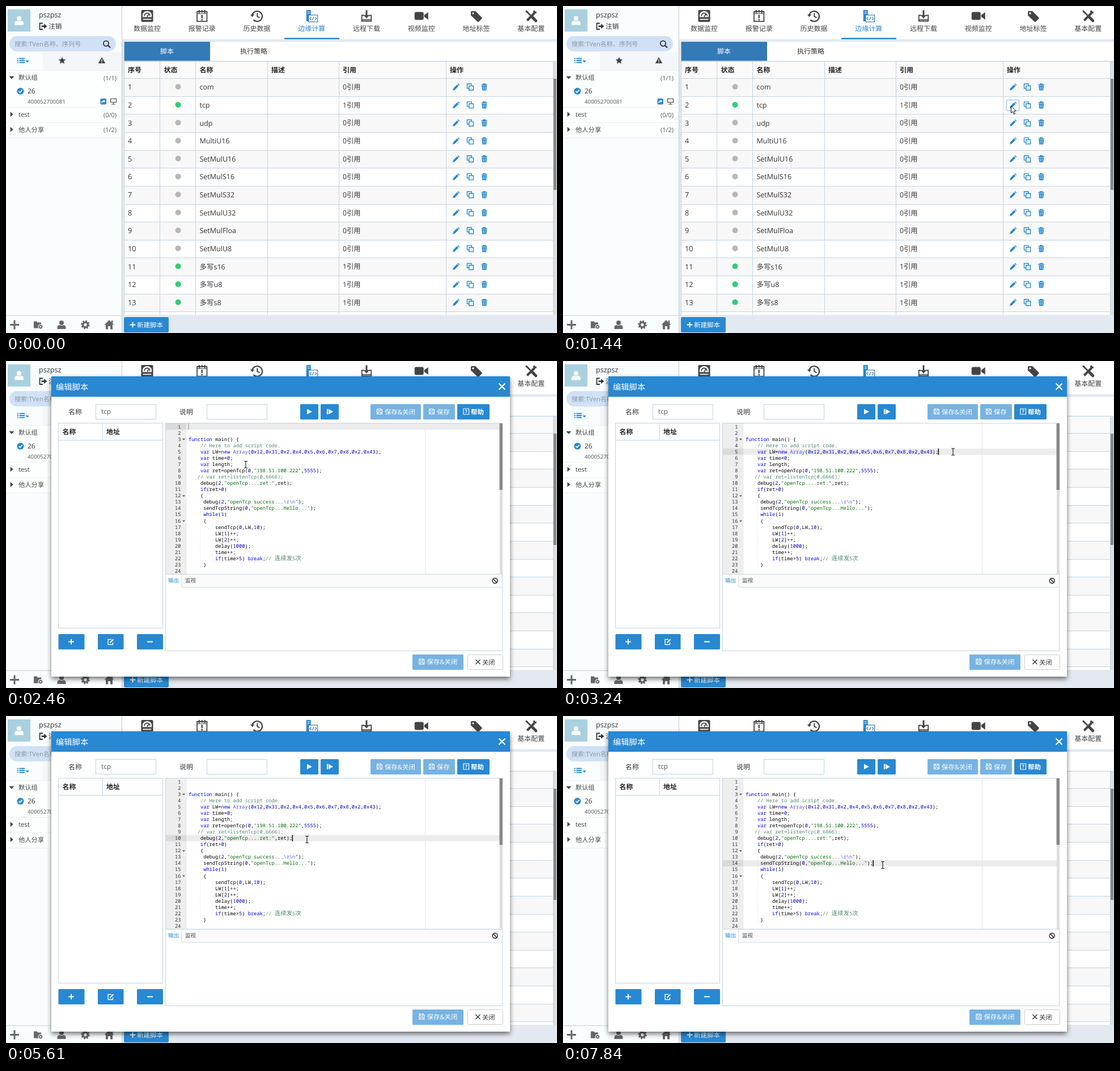
Write an HTML page that moves like this. It is 972x576 px and loops after 8 s.

```html
<!DOCTYPE html>
<html lang="zh-CN">
<head>
<meta charset="utf-8">
<title>Script editor</title>
<style>
html, body { margin: 0; width: 100%; height: 100%; overflow: hidden; background: #fff; }
svg { display: block; width: 972px; height: 576px; }
text { font-family: "Open Sans", "Noto Sans CJK SC", "Noto Sans CJK", sans-serif; white-space: pre; text-rendering: geometricPrecision; }
.code { font-family: "Noto Sans Mono", "Noto Sans CJK SC", monospace; }
</style>
</head>
<body>
<svg id="stage" viewBox="0 0 972 576" xmlns="http://www.w3.org/2000/svg"></svg>
<script>
const BLUE = '#2888d2', PALE = '#77b3e2', INK = '#333', DARK = '#444', LINE = '#c3d3e1';
const CHAR = 5.232, PITCH = 11.07, CODE_X = 322, CODE_Y = 110;

const rect = (x, y, w, h, fill, more = '') =>
  `<rect x="${x}" y="${y}" width="${w}" height="${h}" fill="${fill}" ${more}/>`;
const box = (x, y, w, h, fill, stroke, rx = 0) =>
  rect(x + .5, y + .5, w - 1, h - 1, fill, `stroke="${stroke}" rx="${rx}"`);
const path = (d, fill, more = '') => `<path d="${d}" fill="${fill}" ${more}/>`;
const wire = (d, stroke, width = 1, more = '') =>
  `<path d="${d}" fill="none" stroke="${stroke}" stroke-width="${width}" ${more}/>`;
const dot = (x, y, r, fill, more = '') => `<circle cx="${x}" cy="${y}" r="${r}" fill="${fill}" ${more}/>`;
const at = (x, y, body) => `<g transform="translate(${x} ${y})">${body}</g>`;
// y is the middle of the line of text
const text = (x, y, s, size, fill = INK, more = '') =>
  `<text x="${x}" y="${(y + size * .36).toFixed(2)}" font-size="${size}" fill="${fill}" ${more}>${s.replace(/&/g, '&amp;')}</text>`;
const MID = 'text-anchor="middle"', BOLD = 'font-weight="700"', MEDIUM = 'font-weight="500"';

const person = (fill, s = 1) => `<g transform="scale(${s})">` + dot(0, -3.5, 4, fill) +
  path('M-7.5 7.5V4.5Q-7.5 1 -3.5 .5Q0 2.5 3.5 .5Q7.5 1 7.5 4.5V7.5Z', fill) + '</g>';
const gear = (fill, s = 1) => `<g transform="scale(${s})">` +
  `<circle r="4.6" fill="none" stroke="${fill}" stroke-width="3.6"/>` +
  `<circle r="7" fill="none" stroke="${fill}" stroke-width="2.4" stroke-dasharray="3 2.5"/></g>`;
const plus = (fill, r, w) => wire(`M${-r} 0H${r}M0 ${-r}V${r}`, fill, w);
const floppy = () => wire('M-4.5 -4.5H3L4.5 -3V4.5H-4.5ZM-2.5 -4.5V-1.5H2V-4.5M-2.5 4.5V1.2H2.5V4.5', '#fff', 1.1);

const pencil = path('M-6 6L-4.9 2.2L1.7 -4.4L4.4 -1.7L-2.2 4.9ZM2.5 -5.2L3.7 -6.2L6.2 -3.7L5.2 -2.5Z', BLUE);
const copy = wire('M-2.2 2.2H-5.5V-5.5H2.2V-2.2M-2.2 -2.2H5.5V5.5H-2.2Z', BLUE, 1.4);
const trash = wire('M-5.2 -4H5.2M-2 -4.3V-5.6H2V-4.3', BLUE, 1.4) +
  path('M-4.4 -2.6H4.4L3.5 6H-3.5Z', BLUE) + wire('M-1.5 -1V4.6M1.5 -1V4.6', '#fff', .8);

const tabs = [
  ['数据监控', rect(-10.5, -10.5, 21, 21, DARK, 'rx="2"') +
    path('M-8 2V-2A8 6.5 0 0 1 8 -2V2Z', '#fff') + wire('M-5 0A5 5 0 0 1 5 0M0 1.5L3.5 -4', DARK, 1.8) +
    wire('M-7.5 6H7.5', '#fff', 1.8)],
  ['报警记录', wire('M-8.7 -7.5H8.7V9.7H-8.7Z', DARK, 1.8) + wire('M-5 -10.5V-5M5 -10.5V-5M0 -10.5V-6', DARK, 2.2) +
    wire('M-8 -4H8', DARK, 1) + wire('M0 -2V4M0 5.5V8', DARK, 2.4)],
  ['历史数据', wire('M-8.2 -1.5A9 9 0 1 1 -6 6.8', DARK, 2.2) + path('M-11.5 -2.5H-4.5L-8 2Z', DARK) +
    wire('M.8 -5V.8L5 3.2', DARK, 2)],
  ['边缘计算', rect(-9.5, -10.5, 8, 20, BLUE) + wire('M-7.5 -7.5H-3.5M-7.5 -4.5H-3.5', '#fff', 1) +
    box(-6, -2, 17, 13, '#fff', '#245f9b') + wire('M-1 1.8L-3.5 4.5L-1 7.2M6 1.8L8.5 4.5L6 7.2M3.7 1.5L1.3 7.5', BLUE, 1.2)],
  ['远程下载', wire('M-4 -1H-8.3V9H8.3V-1H4', DARK, 1.8) + wire('M0 -10V1', DARK, 3) +
    path('M-5 -1.5H5L0 4.5Z', DARK) + wire('M-8 6.5H8', DARK, 1.5)],
  ['视频监控', rect(-12, -7, 16, 14, DARK, 'rx="3"') + path('M5 -1.5L12 -6.5V6.5L5 1.5Z', DARK)],
  ['地址标签', path('M-9.5 -6.5Q-9.5 -8.5 -7.5 -8.5H-1.5L9.7 2.5Q10.8 3.8 9.7 5L4.7 10Q3.3 11 2 10L-9.5 -1Z', DARK) +
    dot(-5.5, -4.6, 1.7, '#fff')],
  ['基本配置', wire('M-7 8L6 -5', DARK, 4) + wire('M9.5 -6.5L5.5 -5.5L5.5 -9.5', DARK, 3) +
    wire('M-9 -9L-1 -1', DARK, 2.6) + wire('M2 2L8.5 8.5', DARK, 5, 'stroke-linecap="round"') + path('M-10 -10L-5.5 -8L-8 -5.5Z', DARK)],
];

function sidebar() {
  const down = 'M-4.5 -2.3H4.5L0 2.7Z', right = 'M-2.3 -4.5V4.5L2.7 0Z', grey = '#666';
  const group = (y, arrow, name, count) => at(10, y, path(arrow, DARK)) + text(22, y, name, 11.3, '#444') +
    text(195, y + .8, count, 10.9, '#555', 'text-anchor="end"');
  return rect(0, 0, 204, 576, '#f9fdfe') + rect(65, 81, 139, 32, '#f3f7f9') + rect(0, 113, 204, 119, '#fdfefe') +
    rect(3, 6, 40, 39, '#a9d0de') + at(23, 25.5, person('#fff', 1.05)) +
    text(58, 15.5, 'pszpsz', 12.68) +
    wire('M65 30.5H59.5V41H65', INK, 1.8) + wire('M62.5 35.7H68', INK, 2.6) + path('M67 31.3L72.5 35.7L67 40.1Z', INK) +
    text(75, 36, '注销', 11.7) +
    rect(6, 53, 188, 27, '#d0e1f6', 'rx="13.5"') + text(15, 66.5, '搜索:TVen名称、序列号', 11.1, '#8b97a5') +
    `<circle cx="176.5" cy="66" r="4.6" fill="none" stroke="${INK}" stroke-width="1.8"/>` + wire('M180 69.5L184 73.5', INK, 2.2) +
    wire('M20 92.5H22M20 96H22M20 99.5H22M23.5 92.5H33M23.5 96H33M23.5 99.5H33', BLUE, 1.9) + path('M34.5 96H41L37.8 99.5Z', BLUE) +
    at(99, 96, path('M0 -6.3L1.9 -2.2L6.3 -1.7L3 1.3L3.9 5.8L0 3.5L-3.9 5.8L-3 1.3L-6.3 -1.7L-1.9 -2.2Z', DARK)) +
    path('M169 90L175.2 101H162.8Z', DARK) + wire('M169 94V97.5M169 98.5V100', '#fff', 1.3) +
    wire('M0 113.5H204M0 178.5H204M0 205.5H204M0 232.5H204', '#eceff1') +
    group(126, down, '默认组', '(1/1)') + group(190.8, right, 'test', '(0/0)') + group(217.5, right, '他人分享', '(1/2)') +
    dot(25.5, 150, 6.1, BLUE) + wire('M22.5 150L24.8 152.3L28.7 147.8', '#fff', 1.6) +
    text(38, 150, '26', 11.9) + text(38, 168, '400052700081', 9.75, '#555') +
    rect(166.5, 163, 10.5, 10.5, BLUE, 'rx="2"') + wire('M169 171Q169 167.5 172.5 167.5', '#fff', 1.4) + path('M172 165L175.3 167.6L172 170.2Z', '#fff') +
    wire('M184.5 163.5H194.5V169.5H184.5ZM189.5 169.5V172.5M186 173H193', DARK, 1.2) +
    wire('M0 545.5H204', '#c9ced2') +
    at(15, 561.5, plus(grey, 8, 3)) +
    path('M49 555.5H54.5L56 557.5H62V567.5H49Z', grey) + at(61, 565, dot(0, 0, 4.5, '#f9fdfe') + gear(grey, .45)) +
    at(98, 561.5, person(grey)) + at(140, 561.5, gear(grey, .95)) +
    path('M182 553L190.5 561.5H188V569.5H184V564H180V569.5H176V561.5H173.5Z', grey) + rect(186, 554, 2.3, 5, grey) +
    rect(204, 0, 1, 576, '#c4c9cd');
}

function table() {
  const names = 'com tcp udp MultiU16 SetMulU16 SetMulS16 SetMulS32 SetMulU32 SetMulFloa SetMulU8 多写s16 多写u8 多写s8'.split(' ');
  const cols = { 215: '序号', 278.5: '状态', 341.5: '名称', 468: '描述', 594: '引用', 783: '操作' };
  let out = rect(205, 0, 767, 576, '#e2e9f0') + rect(205, 0, 767, 58.5, '#fff');
  tabs.forEach(([name, icon], i) => {
    const x = 249 + 96.75 * i;
    out += at(x, 17.5, icon) + text(x, 40, name, 12, i === 3 ? BLUE : DARK, MID);
  });
  out += rect(491, 56, 97, 2.5, BLUE) + rect(208, 63, 763, 33.5, '#fff') + rect(208.5, 63, 151.5, 33.5, '#337ab7') +
    text(284, 79.5, '脚本', 11.9, '#fff', MID + MEDIUM) + text(437, 79.5, '执行策略', 12, INK, MID) +
    rect(208, 97, 763, 447, '#fff') + rect(208, 97, 757, 30, '#fafafa');
  for (const x in cols) out += text(+x, 113, cols[x], 12, '#222', BOLD);
  let lines = 'M208 97.5H971';
  names.forEach((name, i) => {
    const top = 127.2 + 31.62 * i, y = top + 15.6, on = [1, 10, 11, 12].includes(i);
    if (i % 2 === 0) out += rect(208, top, 757, 31.6, '#f8f8f8');
    out += text(215, y, `${i + 1}`, 12.68) + dot(303.6, y - .5, 5, on ? '#2fd073' : '#b7b7b7') +
      text(341.5, y, name, 12.5) + text(594, y, on ? '1引用' : '0引用', 12.3) +
      at(794, y, pencil) + at(819, y, copy) + at(843.7, y, trash);
    lines += `M208 ${Math.round(top) + .5}H965`;
  });
  lines += 'M208 538.5H965M208.5 97V544M271.5 97V544M334.5 97V544M461.5 97V544M587.5 97V544M776.5 97V544M965.5 97V544';
  return out + wire(lines, LINE) + rect(966, 98, 5, 446, '#dedede') + rect(966, 128, 5, 196, '#878787') +
    rect(208, 548, 79, 27, BLUE, 'rx="2"') + at(223.5, 561.5, plus('#fff', 4.8, 1.8)) + text(231, 561.5, '新建脚本', 11.5, '#fff', MEDIUM);
}

const code = `

function main() {
    // Here to add script code.
    var LW=new Array(0x12,0x31,0x2,0x4,0x5,0x6,0x7,0x8,0x2,0x43);
    var time=0;
    var length;
    var ret=openTcp(0,"198.51.100.222",5555);
   // var ret=listenTcp(0,6666);
    debug(2,"openTcp....ret:",ret);
    if(ret>0)
    {
     debug(2,"openTcp success...\\r\\n");
     sendTcpString(0,"openTcp...Hello...");
     while(1)
     {
         sendTcp(0,LW,10);
         LW[1]++;
         LW[2]++;
         delay(1000);
         time++;
         if(time>5) break;// 连续发5次
     }
`.split('\n');

const paint = (s, fill) => `<tspan fill="${fill}">${s}</tspan>`;
function highlight(line) {
  const rule = /(\/\/.*)|("[^"]*")|\b(function|var|new|if|while|break)\b|\b(Array)\b|\b(0x[\da-f]+|\d+)\b|>/g;
  return line.replace(rule, (m, note, str, word, type, num) => {
    if (note) return paint(m.replace(/[^\x00-\x7f]+/g, s => `<tspan font-size="10.46">${s}</tspan>`), '#4c886b');
    if (str) return paint(m.replace(/(\\[rn])+/g, s => paint(s, '#585cf6')), '#036a07');
    if (word) return paint(m, '#0000ff');
    if (type) return paint(m, '#4a55d8');
    return num ? paint(m, '#0000cd') : '&gt;';
  });
}

function editor() {
  let out = box(281, 109, 595, 267, '#fff', LINE) + rect(282, 110, 36.5, 265, '#eeeeee') +
    rect(282, 0, 36.5, PITCH, '#dadada', 'id="gutterLine"') + rect(318.5, 0, 552.5, PITCH, '#ececec', 'id="activeLine"') +
    wire('M739.5 110V375', '#e6e6e6');
  code.forEach((line, i) => {
    const top = CODE_Y + PITCH * i, base = (top + 8.5).toFixed(2), indent = line.search(/\S|$/);
    for (let col = 4; col < indent; col += 4)
      out += wire(`M${CODE_X + col * CHAR} ${top}v${PITCH}`, '#dedede', .8, 'stroke-dasharray="1 1"');
    out += `<text class="code" x="308.5" y="${base}" font-size="8.72" fill="#333" text-anchor="end">${i + 1}</text>`;
    if (line.endsWith('{')) out += path(`M311 ${top + 4.7}h5l-2.5 2.8z`, '#555');
    out += `<text class="code" x="${CODE_X + indent * CHAR}" y="${base}" font-size="8.72" fill="#000">${highlight(line.trim())}</text>`;
  });
  return out + rect(871, 110, 5, 265, '#dedede') + rect(870.5, 110, 5.5, 117, '#878787') +
    rect(0, 0, 1.5, PITCH, '#000', 'id="caret"');
}

function dialog() {
  const button = (x, y, w, fill) => rect(x, y, w, 27, fill, 'rx="1.5"');
  const save = (x, y, s) => at(x, y, floppy()) + text(x + 9, y + .5, s, 11.4, '#fff', MEDIUM);
  return rect(80, 27, 809, 529, '#fff', 'filter="url(#shadow)"') + rect(80, 27, 809, 36, BLUE) +
    text(88, 45.5, '编辑脚本', 14.3, '#fff', MEDIUM) + wire('M869.5 39.5L880.5 50.5M880.5 39.5L869.5 50.5', '#fff', 2) +
    text(110, 89.5, '名称', 11.9) + box(158, 76, 107, 27, '#fff', '#bdd3e7') + text(168, 89, 'tcp', 11.9, '#555') +
    text(306, 89.5, '说明', 11.9) + box(354, 76, 107, 27, '#fff', '#bdd3e7') +
    button(519, 76, 32, BLUE) + path('M531 84.5L540 89.3L531 94Z', '#fff') +
    button(555, 76, 32, BLUE) + rect(566, 84.5, 2, 9.5, '#fff') + path('M569 84.5L577 89.3L569 94Z', '#fff') +
    button(643, 76, 89, PALE) + save(659, 89, '保存&关闭') + button(736, 76, 56, PALE) + save(751, 89, '保存') +
    button(796, 76, 57, BLUE) + wire('M807 84H816.5V94H807Z', '#fff', 1.2) + text(811.8, 89, '?', 8.5, '#fff', MID + BOLD) +
    text(820, 89.5, '帮助', 11.5, '#fff', BOLD) +
    box(92, 109, 185, 362, '#fff', LINE) + wire('M92 139.5H277M170.5 109V139', LINE) +
    text(99.5, 125, '名称', 11.9, '#222', BOLD) + text(177, 125, '地址', 11.9, '#222', BOLD) +
    button(92.5, 481, 46, BLUE) + at(115, 494.5, plus('#fff', 4.8, 2)) +
    button(162, 481, 45.5, BLUE) + wire('M186 490.5H180V499.5H188.5V495.5', '#fff', 1.3) + wire('M183.5 496.3L189.5 490.3', '#fff', 2) +
    button(231, 481, 46, BLUE) + wire('M249 494.5H259', '#fff', 2) +
    editor() +
    box(281, 375, 595, 136, '#fff', LINE) + rect(310, 376, 565, 22, '#fafafa') + wire('M309.5 376V398M310 398.5H876', '#d3dde5') +
    text(286, 387, '输出', 9.6, BLUE) + text(316, 387, '监视', 9.6, '#444') +
    `<circle cx="862.7" cy="387" r="4.5" fill="none" stroke="#222" stroke-width="1.4"/>` + wire('M859.7 384L865.7 390', '#222', 1.4) +
    button(717, 517, 90, PALE) + save(733.5, 529.5, '保存&关闭') +
    box(814, 517, 63, 27, '#fff', '#ccc', 2) + wire('M828.5 526L836.5 534M836.5 526L828.5 534', INK, 1.4) + text(840, 530.5, '关闭', 11.3);
}

const stage = document.getElementById('stage');
stage.innerHTML =
  `<defs><filter id="shadow" x="-5%" y="-5%" width="110%" height="112%"><feDropShadow dx="0" dy="4" stdDeviation="4" flood-color="#000" flood-opacity=".55"/></filter></defs>` +
  table() + sidebar() + box(782, 165, 23, 20, 'none', '#86b4e4', 1).replace('<rect', '<rect id="ring"') +
  `<g id="dialog">${dialog()}</g>` +
  `<g id="arrow">${path('M.5 .5V13L3.4 10.3L5.4 15L7.6 14L5.6 9.5H9.3Z', '#fff', 'stroke="#111" stroke-width="1"')}</g>` +
  `<g id="beam">${wire('M-3 -6H-.8L0 -5.2L.8 -6H3M0 -5.5V5.5M-3 6H-.8L0 5.2L.8 6H3', '#222', 1.2)}</g>`;

const part = {};
for (const id of ['ring', 'dialog', 'arrow', 'beam', 'gutterLine', 'activeLine', 'caret']) part[id] = document.getElementById(id);
const show = (id, on) => part[id].setAttribute('visibility', on ? 'visible' : 'hidden');
const move = (id, x, y) => part[id].setAttribute('transform', `translate(${x} ${y})`);

const OPEN = 1520;
// first step, last step, step count, end x, end y, optional bend
const moves = [
  [70, 840, 11, 788, 184, 815, 330], [890, 1050, 3, 790, 175.5],
  [OPEN, OPEN, 1, 792, 176], [1600, 1750, 3, 508, 250],
  [1910, 2460, 8, 423, 182.5], [2690, 3160, 7, 688, 160],
  [3390, 3630, 4, 602, 184.5], [3800, 4270, 7, 583, 194],
  [4730, 5430, 10, 531, 217.5], [5830, 6440, 9, 557, 245.5],
  [7130, 7380, 4, 564, 261.5], [7760, 7760, 1, 564, 262.5],
];
const clicks = [[OPEN, 1], [3240, 5], [4350, 8], [5610, 10], [6760, 13], [7840, 14]];

function pointer(t) {
  let x = 645, y = 511;
  for (const [from, to, count, ex, ey, bx = (x + ex) / 2, by = (y + ey) / 2] of moves) {
    if (t < from) break;
    const gap = (to - from) / (count - 1) || 1;
    const k = Math.min(count, Math.floor((t - from) / gap + 1e-6) + 1) / count;
    const s = (1 - Math.cos(Math.PI * k)) / 2, r = 1 - s;
    x = x * r * r + 2 * bx * r * s + ex * s * s;
    y = y * r * r + 2 * by * r * s + ey * s * s;
  }
  return [x, y];
}

function draw(t) {
  const open = t >= OPEN, [x, y] = pointer(t);
  part.dialog.style.display = open ? '' : 'none';
  show('ring', t >= 1290 && !open);
  show('arrow', t >= 70 && !open);
  show('beam', open);
  move('arrow', x, y);
  move('beam', x, y);
  const [since, line] = clicks.filter(c => c[0] <= t).pop() || clicks[0];
  const top = PITCH * (line - 1) + CODE_Y;
  move('gutterLine', 0, top);
  move('activeLine', 0, top);
  move('caret', CODE_X + code[line - 1].length * CHAR - .5, top);
  part.caret.setAttribute('fill', line === 1 ? '#aaa' : '#000');
  part.caret.style.opacity = line === 1 || (t - since + 10) % 1000 < 510 ? 1 : 0;
}

const start = performance.now();
function tick() {
  draw((performance.now() - start) % 8000);
  requestAnimationFrame(tick);
}
tick();
</script>
</body>
</html>
```
